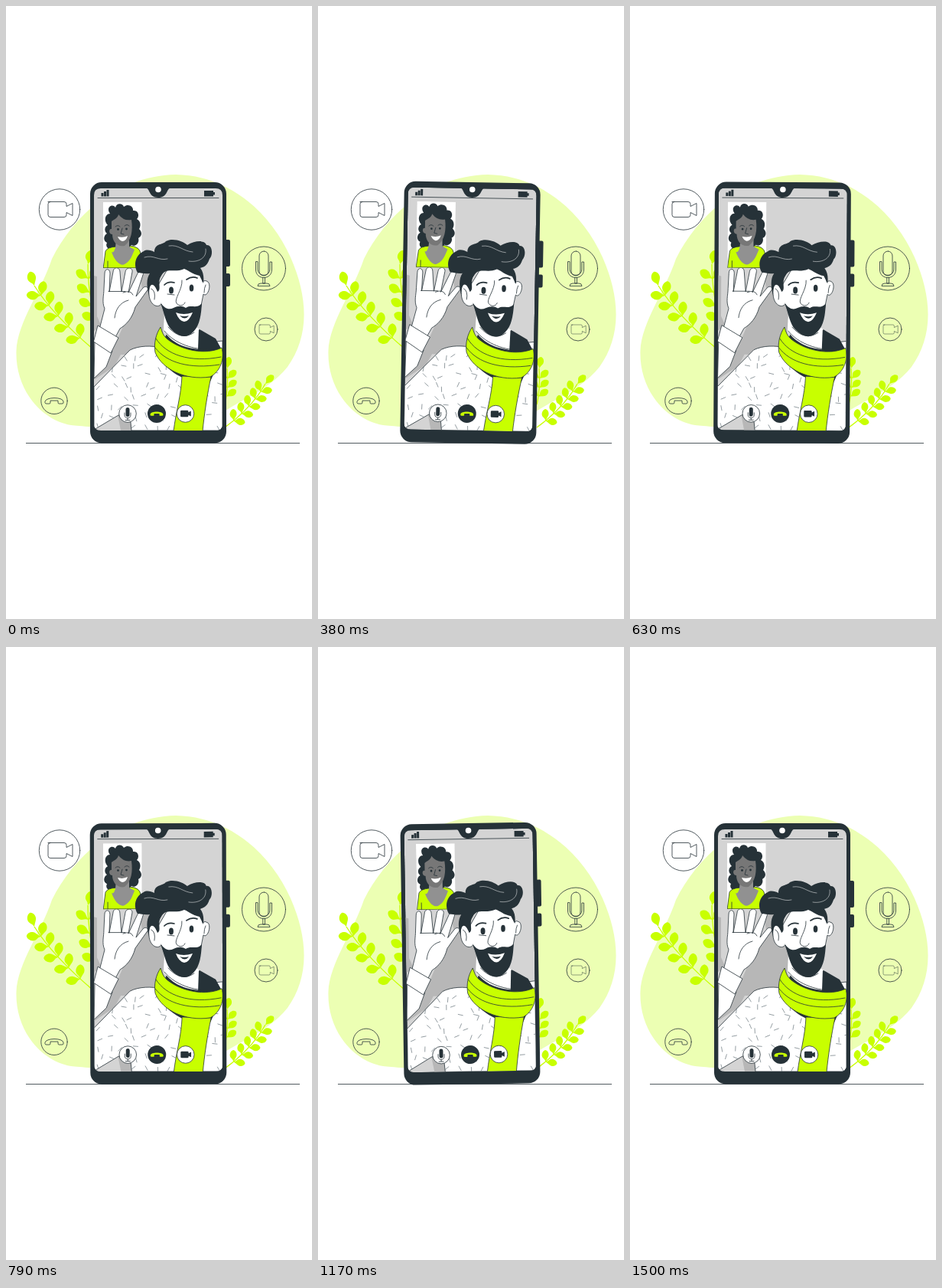
Animation of 400 by 800 pixels, one loop 1.54 s. Source, as an HTML page:

```html
<!DOCTYPE html>
<html lang="en">
<head>
<meta charset="utf-8">
<title>Video call</title>
<style>
html, body { margin: 0; width: 100%; height: 100%; overflow: hidden; background: #fff; }
svg { display: block; width: 400px; height: 800px; }
.ink { fill: #263238; }
.lime { fill: #c8ff00; }
.line { fill: none; stroke: #263238; stroke-width: .8; stroke-linecap: round; stroke-linejoin: round; }
.edge { stroke: #263238; stroke-width: .8; stroke-linejoin: round; }
.white { fill: #fff; }
</style>
</head>
<body>
<svg viewBox="0 0 400 800">
  <defs>
    <clipPath id="screen"><path d="M124 238H184C188 239 187 250 199 250S210 239 214 238H274Q283 238 283 247V545Q283 554 274 554H124Q115 554 115 545V247Q115 238 124 238Z"/></clipPath>
    <clipPath id="sweater"><path id="body" d="M115 497L162 449C174 443 190 443 204 446L283 437V554H164L162 533 147 534 115 553Z"/></clipPath>
    <clipPath id="inset"><rect x="127" y="256" width="50.5" height="86"/></clipPath>
    <path id="camera" d="M-15-10H6Q9-10 9-7V-4L17-8V8L9 4V7Q9 10 6 10H-12Q-15 10-15 7V-7Q-15-10-12-10"/>
    <path id="handset" d="M-12 1C-11-5 11-5 12 1V3Q12 4 10 4H6Q5 4 5 2V0H-5V2Q-5 4-6 4H-10Q-12 4-12 3Z"/>
  </defs>

  <path fill="#ecffb3" d="M222 220C292 221 346 270 372 328C397 385 395 433 368 471C344 500 315 510 282 531C230 558 110 550 85 547C45 540 12 500 13.500 450C15 413 47 370 60 330C86 278 140 222 222 220Z"/>
  <g id="plants"></g>

  <g class="line">
    <circle cx="70" cy="265.500" r="26.700" fill="#fff"/><use href="#camera" x="70" y="265.500"/>
    <circle cx="337" cy="342.500" r="28.500"/>
    <rect x="331" y="320" width="12" height="32" rx="6"/>
    <path d="M326.500 334V344C326.500 358 347.500 358 347.500 344V334H345V343C345 354 329 354 329 343V334ZM335.800 354.500V362H338.500V354.500M329 365Q329 362 333 362H341Q345 362 345 365Z"/>
    <circle cx="340" cy="422" r="15"/><use href="#camera" transform="translate(340 422)scale(.6)"/>
    <circle cx="63" cy="515.300" r="17.200"/><use href="#handset" x="63" y="515"/>
    <path d="M26 570.500H384" stroke-linecap="butt"/>
  </g>

  <g id="phone">
    <path class="ink" d="M287 305H291Q293 305 293 307V338Q293 340 291 340H287ZM287 349H291Q293 349 293 351V364Q293 366 291 366H287Z"/>
    <rect class="ink" x="110" y="230" width="178" height="340.500" rx="15"/>
    <g clip-path="url(#screen)">
      <path fill="#d4d4d4" d="M115 238H283V554H115Z"/>
      <path fill="#b7b7b7" d="M115 352L119 353V405L125 418 115 424ZM164 392L179 374 174 348 190 345 208 395 203 455 150 455 142 470 115 488 133 450 147 432ZM145 528H164V554H150Z"/>
      <path d="M116 436L139 450 131 471 115 486Z" class="white edge"/>
      <path class="white edge" d="M122 422L129 395C125 386 128 378 128 369L129 349C129 342 136 342 136 349L135 373 140 347C140 340 149 340 149 347L151 373 156 347C157 340 166 341 165 347L160 374 172 349C176 343 181 346 179 351L170 379 179 368C183 364 188 368 184 372L169 393C165 408 157 416 149 421L142 434Z"/>
      <path class="line" d="M134 372.500H156M160 384C148 387 143 397 142 407M153 374Q163 370 166 377"/>
      <path class="white edge" d="M120 417L147 433 137 453 114.500 438Z"/>

      <use href="#body" class="white edge"/>
      <path id="dashes" clip-path="url(#sweater)" fill="none" stroke="#66737a" stroke-width=".7"/>
      <path class="ink" d="M198 452C204 472 235 496 267 490L284 452 274 434 253 422 239 432 214 420Z"/>
      <path class="lime edge" d="M230 483C229 508 222 530 219 555H257C259 534 263 507 268 484Z"/>
      <path class="white" d="M207 402L206 424C218 441 234 446 251 448L252 421Z"/>
      <path class="lime edge" d="M202 419C196 428 193 440 195 452C204 474 234 489 267 484C280 477 286 461 282 446C260 456 231 449 214 437C205 431 204 425 202 419Z"/>
      <path class="line" d="M196 434C209 455 240 466 281 458M195 446C210 466 241 474 279 468M207 424C220 441 247 449 266 448"/>

      <g id="inset-view">
        <g clip-path="url(#inset)">
          <path fill="#fff" d="M127 256H178V342H127Z"/>
          <path class="ink" d="M136 271C130 263 139 257 143 263C145 256 153 258 154 262C160 257 167 262 166 267C173 266 175 274 171 278C177 281 176 288 174 291C179 296 177 301 173 303C175 309 169 315 164 312L157 318 139 315C135 320 129 314 132 309C126 306 128 299 132 297C127 293 130 287 133 286C127 280 130 271 136 271Z"/>
          <path class="lime edge" d="M127 343L130 320Q132 315 144 314L152 336 162 313Q175 314 176 323L178 343Z"/>
          <path fill="#919191" d="M144 304L143 315Q141 323 138 321C142 333 150 340 155 337C163 333 165 325 168 318L161 314V303Z"/>
          <path fill="#777" d="M138 281C142 278 146 277 147 272Q154 281 164 279C166 293 164 306 155 313C145 315 139 307 139 298C134 298 134 290 138 291Z"/>
          <path class="line" d="M143 288Q146 285 149 288M155 287Q158 284 161 287M152 290L150 297 154 298"/>
          <circle class="ink" cx="146.500" cy="291.500" r="1.400"/><circle class="ink" cx="157.500" cy="291" r="1.400"/>
          <path class="white" d="M146 301Q153 303 159 300Q157 307 152 307Q148 306 146 301Z"/>
          <path class="line" d="M133 333V342M171 333V342M127 341.800H177" stroke-width=".6"/>
        </g>
      </g>

      <path class="white edge" d="M199 364C193 356 185 363 187 377C188 390 198 395 203 389L208 402 232 423 253 401 258 376C263 381 269 365 264 360Q260 357 257 360L255 345 215 337Z"/>
      <path class="ink" d="M172 348C166 338 169 325 180 320C184 317 190 319 194 321C194 309 206 312 209 307C218 302 232 307 237 312C247 306 260 305 262 312C270 311 271 325 266 330C263 340 257 341 254 342C258 347 259 354 258 362L253 352C243 350 239 345 233 343C220 349 209 340 203 352C197 360 204 370 198 373C193 359 186 361 187 378C183 364 184 355 188 349C181 350 177 348 172 348Z"/>
      <path class="line" style="stroke:#fff;stroke-width:.5" d="M181 328C193 324 199 333 211 330M213 313C226 311 231 320 244 321M239 333C251 335 263 329 261 317"/>
      <path class="ink" d="M202 387C207 395 213 397 219 394C225 391 230 391 235 394C242 389 249 396 256 388C255 402 254 416 245 425C235 436 224 430 216 422C209 415 207 401 202 387Z"/>
      <path class="white" d="M222 400Q232 404 244 400Q239 412 233 412Q226 411 222 400Z"/>
      <path class="ink" d="M227 404Q233 406 239 404Q234 411 227 404Z"/>
      <ellipse class="ink" cx="216" cy="371" rx="3" ry="4.500"/><ellipse class="ink" cx="242.500" cy="368" rx="2.800" ry="4.500"/>
      <path class="line" style="stroke-width:1.700" d="M207 364Q212 359 220 361M236 357Q243 352 250 355"/>
      <path class="line" d="M230 358C231 370 219 383 223 388C226 392 232 392 234 387M211 376L220 377M190 369Q196 372 194 383M261 364Q259 368 259 374M212 419Q229 438 246 426"/>

      <g transform="translate(159 532)">
        <circle r="11.300" class="white edge"/><rect class="ink" x="-2.500" y="-8" width="5" height="12" rx="2.500"/>
        <path class="line" d="M-4-1V2C-4 7 4 7 4 2V-1M0 6V8M-3 8.500H3"/>
      </g>
      <circle class="ink" cx="197" cy="532" r="12"/>
      <use href="#handset" class="lime" transform="translate(197 532)scale(.7)"/>
      <circle class="white edge" cx="234.500" cy="532" r="11.300"/>
      <use href="#camera" class="ink" transform="translate(234.500 532)scale(.43)"/>
      <path class="line" d="M120 250.500H278"/>
      <path class="ink" d="M124.500 244H127.500V248.500H124.500ZM128 242H131V248.500H128ZM131.500 240H134.500V248.500H131.500ZM259 241H271V243H273V246.500H271V248.500H259Z"/>
    </g>
    <circle class="white" cx="199" cy="239.500" r="3.800"/>
  </g>
</svg>
<script>
const el = id => document.getElementById(id);

// Quadratic stem with leaf pairs and one leaf at the tip
function plant([x0, y0], [x1, y1], [x2, y2], pairs, scale) {
  const leaf = (x, y, a) => `<path class="lime" transform="translate(${x} ${y})rotate(${a})scale(${scale})" d="M0 0Q4-1 6-4C10-8 18-5 19 0C18 5 11 7 7 4Q4 2 0 0Z"/>`;
  let out = `<path d="M${x0} ${y0}Q${x1} ${y1} ${x2} ${y2}" fill="none" stroke="#c8ff00" stroke-width="1.3"/>`;
  for (let i = 1; i <= pairs + 1; i++) {
    const t = i / (pairs + 1), u = 1 - t;
    const x = u * u * x0 + 2 * u * t * x1 + t * t * x2;
    const y = u * u * y0 + 2 * u * t * y1 + t * t * y2;
    const a = Math.atan2(u * (y1 - y0) + t * (y2 - y1), u * (x1 - x0) + t * (x2 - x1)) * 180 / Math.PI;
    out += i > pairs ? leaf(x, y, a + 15) : leaf(x, y, a - 52) + leaf(x, y, a + 48);
  }
  return out;
}
el('plants').innerHTML =
  plant([114, 448], [61, 403], [37, 365], 5, 1) +
  plant([123, 425], [107, 385], [107, 337], 4, 1) +
  plant([286, 550], [322, 524], [339, 493], 5, .8) +
  plant([286, 520], [291, 500], [289, 473], 3, .8);

// Loose knit pattern
let seed = 7, knit = '';
const random = () => (seed = seed * 16807 % 2147483647) / 2147483647;
for (let y = 452; y < 555; y += 13)
  for (let x = 118; x < 284; x += 15) {
    const a = random() * 3.1, px = x + random() * 9, py = y + random() * 7;
    knit += `M${px} ${py}l${7 * Math.cos(a)} ${7 * Math.sin(a)}`;
  }
el('dashes').setAttribute('d', knit);

// Linear interpolation through [time, value] keys
function track(keys, t) {
  const i = Math.max(1, keys.findIndex(k => k[0] >= t));
  const [ta, a] = keys[i - 1], [tb, b] = keys[i];
  return a + (b - a) * (t - ta) / (tb - ta);
}
const sway = [[0, 0], [375, 1], [1125, -1], [1500, 0]];
const drift = [[0, 0], [750, 0], [960, .9], [1170, 3.2], [1500, 0]];

function draw() {
  const t = Math.min(performance.now() % 1540, 1500);
  el('phone').setAttribute('transform', `rotate(${track(sway, t)} 199 400)`);
  el('inset-view').setAttribute('transform', `translate(${track(drift, t)} 0)`);
  requestAnimationFrame(draw);
}
draw();
</script>
</body>
</html>
```
